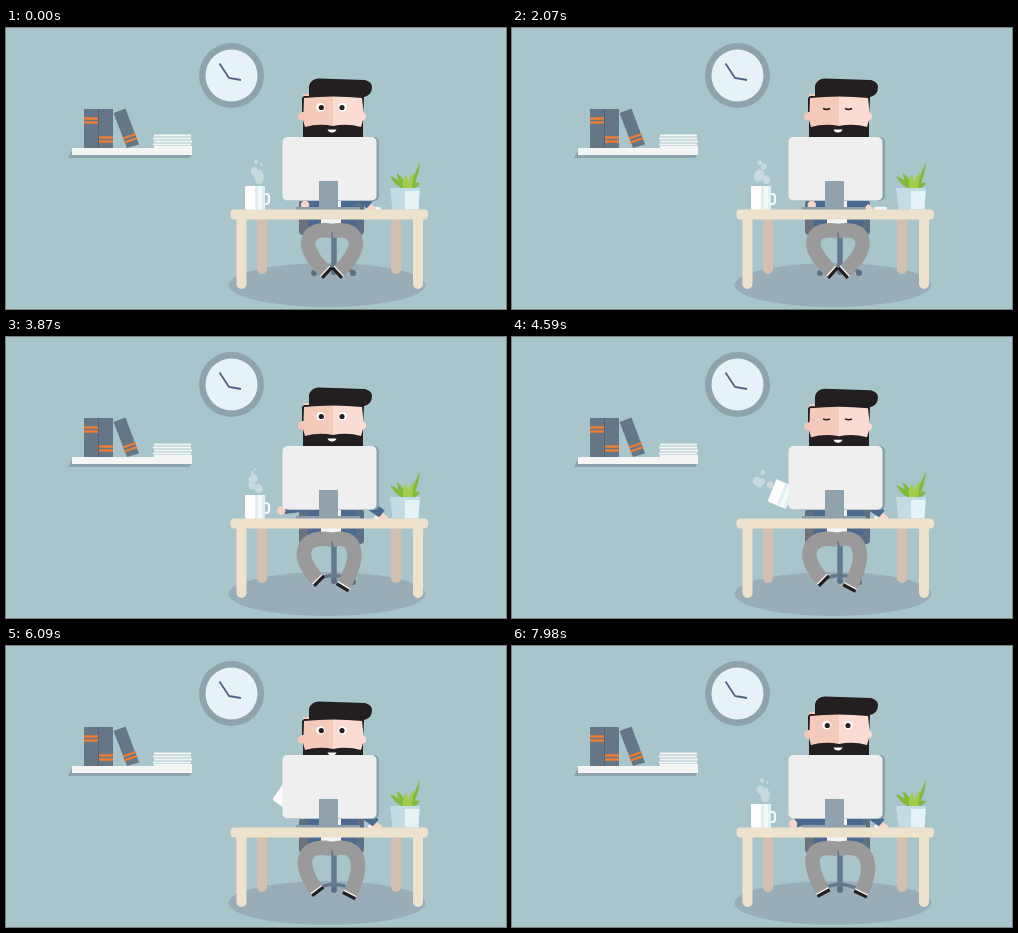
An HTML page that plays this animation: 500 by 281 pixels, repeating every 8000 ms.

```html
<!DOCTYPE html>
<html lang="en">
<head>
<meta charset="utf-8">
<title>Coffee break at the desk</title>
<style>
  html, body { margin: 0; width: 100%; height: 100%; overflow: hidden; background: #a9c5cc; }
  svg { display: block; width: 100vw; height: 100vh; }
</style>
</head>
<body>
<svg viewBox="0 0 500 281">
  <!-- clock -->
  <circle cx="225.5" cy="47.5" r="32.5" fill="#8fa3ac"/>
  <circle cx="225.5" cy="47.5" r="26" fill="#e7f2f8"/>
  <path d="M213.5 35.5L223 50L235 52" fill="none" stroke="#4c6280" stroke-width="1.8"/>

  <!-- shelf -->
  <path d="M66 122L62 130H183L186 126Z" fill="#8da3ae"/>
  <path d="M66 120H186V127H66Z" fill="#f5f5f5"/>
  <path d="M78 81h14v39h-14zM93 81h14v39h-14zM107.500 85L119.500 80.500L133 116.500L121 120Z" fill="#657687"/>
  <path d="M92.500 81v39" stroke="#536475"/>
  <path d="M78 90.500h14M78 94.500h14M93 109.500h14M93 113.500h14M116.800 110.500l13-4.500M118.200 114.500l13-4.500" stroke="#ef7d33" stroke-width="2.300"/>
  <path d="M148 107.500h37M147 110.500h38M148 113.500h38M147 116.500h38M148 119h38" stroke="#f4f6f6" stroke-width="2.200"/>

  <!-- floor and rear of the desk -->
  <ellipse cx="321" cy="257" rx="98.500" ry="22" fill="#98adb8"/>
  <path d="M256 188V241M390 188V241" stroke="#d3c0b1" stroke-width="10" stroke-linecap="round"/>

  <!-- chair -->
  <g fill="none" stroke="#64798c">
    <path d="M328 205V242" stroke-width="5.500"/>
    <path d="M308 244Q328 233 348 244" stroke-width="3.500"/>
  </g>
  <g fill="#5d7083">
    <circle cx="308" cy="245" r="3"/><circle cx="328" cy="244" r="3"/><circle cx="347" cy="245" r="3"/>
    <rect x="293" y="172" width="65" height="35" rx="4"/>
  </g>
  <path d="M294 186h7v20h-5q-2 0-2-3z" fill="#6d727b"/>

  <!-- man -->
  <path d="M302 150h49v48h-49z" fill="#4c6a90"/>
  <path d="M315 150h20v46h-20z" fill="#f3f3f1"/>
  <g id="legs" fill="none"></g>
  <g id="head">
    <circle cx="296" cy="88.500" r="4" fill="#f3c8b8"/>
    <circle cx="356" cy="88.500" r="4" fill="#fbdcd2"/>
    <path d="M297 66h30v50h-30z" fill="#f4cabb"/>
    <path d="M327 66h30v50h-30z" fill="#fbdcd2"/>
    <path d="M296 70L298 68H303V58Q305 50.500 313 50.500L359 52Q366 54 366 59Q366 67 358 69L357.500 84L356 70Q327 67 298 70L297.500 84H296Z" fill="#231f20"/>
    <path d="M297 92V118H357V92L355 99Q341 95 327 98Q313 95 299 99Z" fill="#231f20"/>
    <path d="M321.500 101.500h9q-1 3-4.500 3t-4.500-3z" fill="#fff"/>
    <g id="openEyes">
      <circle cx="314.500" cy="79.300" r="4.200" fill="#fff"/>
      <circle cx="336.500" cy="79.300" r="4.200" fill="#fff"/>
      <g id="pupils" fill="#231f20">
        <circle cx="315.300" cy="79.500" r="2.600"/><circle cx="336" cy="79.500" r="2.600"/>
      </g>
    </g>
    <path id="closedEyes" d="M311 80.500q3.500 1.800 7 0M333 80.500q3.500 1.800 7 0" fill="none" stroke="#231f20" stroke-width="1.500"/>
  </g>
  <rect id="mouse" x="362" y="178.800" width="13" height="4" rx="2" fill="#f4f6f6"/>
  <g id="mouseArm">
    <path d="M350 163L370 177" stroke="#4c6a90" stroke-width="9"/>
    <path d="M366 181L371 176L376 180V182H366Z" fill="#f7d5c9"/>
  </g>
  <g id="mug">
    <path d="M8 -4h3q3 0 3 3v4q0 3-3 3h-3" fill="none" stroke="#f6f9f9" stroke-width="2.200"/>
    <path d="M-10 -12h20V10q0 2-2 2h-16q-2 0-2-2z" fill="#fdfdfd"/>
    <path d="M0 -12h10V10q0 2-2 2h-8z" fill="#e2eef2"/>
    <path d="M3 -12h4v24h-4z" fill="#f4f9fa"/>
  </g>
  <path id="cupSleeve" stroke="#4c6a90" stroke-width="9"/>
  <circle id="cupHand" r="4.200" fill="#f7d5c9"/>

  <!-- monitor -->
  <path d="M290 179h64v3h-64z" fill="#8a9ea9"/>
  <rect x="279" y="109" width="94" height="64" rx="5" fill="#8ba1ac"/>
  <rect x="276.500" y="109" width="94" height="63.500" rx="5" fill="#efefef"/>
  <path d="M313 153h19v28h-19z" fill="#8fa2ad"/>

  <g id="steam" fill="#fff" opacity=".36"></g>

  <!-- plant -->
  <g fill="#83b93f">
    <path d="M395 160Q387 155 384 148Q394 151 399 160Z"/>
    <path d="M396 160Q391 151 391 145Q399 151 401 160Z"/>
    <path d="M400 160Q409 148 414 133Q413 150 406 160Z"/>
    <path d="M404 160Q408 153 414 155Q411 160 408 160Z"/>
  </g>
  <path d="M397 160Q396 152 400 146Q403 153 403 160ZM402 160Q402 149 408 144Q407 152 406 160Z" fill="#a3cb4c"/>
  <path d="M384 160h30l-1.500 21.500h-26z" fill="#c3dce3"/>
  <path d="M399 163h14.500l-1 18.500h-13.500z" fill="#e5f2f6"/>

  <!-- desk front -->
  <g fill="#efe2cc">
    <rect x="224.500" y="181.500" width="197.500" height="10" rx="4"/>
    <path d="M230.500 186h10v70a5 5 0 0 1-10 0zM407 186h10v70a5 5 0 0 1-10 0z"/>
  </g>
</svg>
<script>
const LOOP = 8000;
const $ = id => document.getElementById(id);
const set = (el, attrs) => { for (const k in attrs) el.setAttribute(k, attrs[k]); };
const mix = (a, b, p) => a + (b - a) * p;
const rand = n => { const v = Math.sin(n * 127.1 + 3.7) * 43758.5453; return v - Math.floor(v); };

function add(parent, tag, attrs = {}) {
  const el = document.createElementNS(parent.namespaceURI, tag);
  set(el, attrs);
  return parent.appendChild(el);
}

// Value at time t along [time, value] stops, eased between them.
function track(t, stops) {
  if (t <= stops[0][0]) return stops[0][1];
  for (let i = 1; i < stops.length; i++) {
    const [t0, a] = stops[i - 1], [t1, b] = stops[i];
    if (t < t1) return mix(a, b, (1 - Math.cos(Math.PI * (t - t0) / (t1 - t0))) / 2);
  }
  return stops[stops.length - 1][1];
}

// Each leg: two curve controls and the ankle, all from one hip.
const HIP = [326, 203];
const CROSSED = [[302, 198, 290, 216, 320, 244], [350, 198, 362, 216, 332, 244]];
const STEPPING = [[298, 196, 286, 218, 311, 243], [348, 196, 356, 216, 338, 250]];
const PLANTED = [[294, 197, 296, 218, 311, 246], [356, 196, 363, 218, 349, 247]];
const legs = [0, 1].map(() => ({
  trouser: add($('legs'), 'path', { stroke: '#9a9a9b', 'stroke-width': 14.5 }),
  sock: add($('legs'), 'path', { stroke: '#f1f1ef', 'stroke-width': 2 }),
  shoe: add($('legs'), 'path', { stroke: '#231f20', 'stroke-width': 3.2 })
}));

function drawLegs(t) {
  const step = track(t, [[3300, 0], [4050, 1]]);
  const plant = track(t, [[5720, 0], [6450, 1]]);
  const spread = (1 - Math.cos(2 * Math.PI * t / 1170)) * (1 - step);
  legs.forEach((leg, i) => {
    const c = CROSSED[i].map((v, k) => mix(mix(v, STEPPING[i][k], step), PLANTED[i][k], plant));
    const out = i ? spread : -spread;
    c[0] += out * 1.2;
    c[2] += out * 1.2;
    const [, , x2, y2, x, y] = c;
    const len = Math.hypot(x - x2, y - y2), dx = (x - x2) / len, dy = (y - y2) / len;
    const across = d => {
      const cx = x + dx * d, cy = y + dy * d;
      return `M${cx - dy * 7} ${cy + dx * 7}L${cx + dy * 7} ${cy - dx * 7}`;
    };
    set(leg.trouser, { d: `M${HIP}C${c}` });
    set(leg.sock, { d: across(-0.8) });
    set(leg.shoe, { d: across(1.2) });
  });
}

function mugAt(t) {
  const lift = track(t, [[4300, 0], [5100, 1], [5700, 1], [6450, 0]]);
  return { lift, x: mix(249, 318, lift), y: mix(170, 126, lift), turn: lift * 75 };
}

function mugPoint(mug, x, y) {
  const a = mug.turn * Math.PI / 180, c = Math.cos(a), s = Math.sin(a);
  return [mug.x + x * c - y * s, mug.y + x * s + y * c];
}

function drawArms(t, mug) {
  set($('mug'), { transform: `translate(${mug.x} ${mug.y}) rotate(${mug.turn})` });
  const reach = track(t, [[3400, 0], [4150, 1], [6800, 1], [7300, 0]]);
  const typing = t < 3400 ? Math.sin(t / 75) * 1.3 : 0;
  const rest = t < 5000 ? [299 + typing, 177] : [281, 178];
  const grip = mugPoint(mug, 16, 2);
  const [x, y] = rest.map((v, i) => mix(v, grip[i], reach));
  set($('cupSleeve'), { d: `M314 168L${x + 3} ${y - 1}` });
  set($('cupHand'), { cx: x, cy: y });

  const slide = track(t, [[0, -6], [450, -14], [950, 0], [1600, 0], [2100, -15], [3100, -15],
    [3500, 0], [3800, 7], [4100, 0], [7350, 0], [7650, 8], [7950, 0]]);
  set($('mouseArm'), { transform: `translate(${slide})` });
  set($('mouse'), { transform: `translate(${Math.max(0, slide)})` });
}

const BLINKS = [[560, 700], [2000, 2140], [2700, 2840], [3650, 3790], [4400, 5050]];

function drawHead(t) {
  const drop = track(t, [[4430, 0], [5230, 14], [5720, 14], [6350, 0]]);
  set($('head'), { transform: `translate(0 ${drop})` });
  const closed = BLINKS.some(([a, b]) => t >= a && t < b);
  set($('openEyes'), { visibility: closed ? 'hidden' : 'visible' });
  set($('closedEyes'), { visibility: closed ? 'visible' : 'hidden' });
  const look = track(t, [[200, 0], [500, -1], [800, 0], [1250, 0], [1450, 1], [1650, 0]]);
  set($('pupils'), { transform: `translate(${look})` });
}

// Puffs stay where the mug was when they left it, so they trail behind it.
const PUFFS = 54, GAP = LOOP / PUFFS, LIFE = 1000;
const puffs = Array.from({ length: 7 }, () => add($('steam'), 'ellipse'));

function drawSteam(t) {
  const newest = Math.floor(t / GAP);
  puffs.forEach((puff, i) => {
    const n = newest - i, born = n * GAP, age = (t - born) / LIFE;
    const mug = mugAt(born), seed = (n + PUFFS) % PUFFS;
    if (age >= 1 || mug.lift > 0.5) return set(puff, { rx: 0, ry: 0 });
    const [x, y] = mugPoint(mug, 0, -12);
    const r = mix(2.6, 5.2, rand(seed)) * Math.sin(Math.PI * Math.pow(age, 0.65));
    const cx = x + 1 + (rand(seed + 60) - 0.5) * 9 + Math.sin(age * 4 + seed) * 2;
    const cy = y - 3 - age * mix(18, 30, rand(seed + 120));
    set(puff, { cx, cy, rx: r, ry: r * 1.15, transform: `rotate(${rand(seed + 180) * 60 - 30} ${cx} ${cy})` });
  });
}

function frame(now) {
  const t = now % LOOP;
  const mug = mugAt(t);
  drawLegs(t);
  drawHead(t);
  drawArms(t, mug);
  drawSteam(t);
  requestAnimationFrame(frame);
}
frame(0);
</script>
</body>
</html>
```
